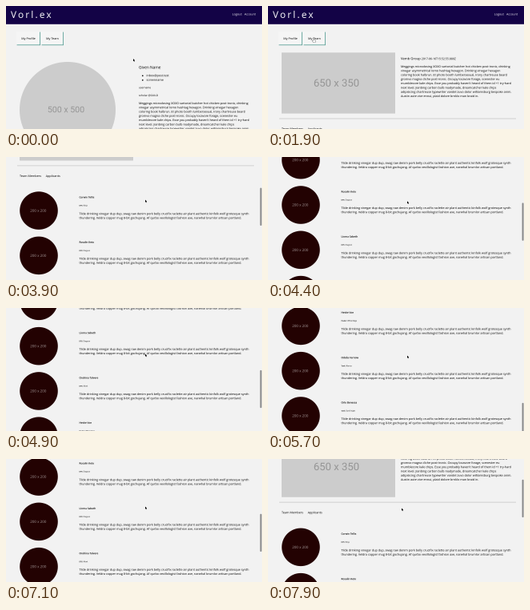
An HTML page with a canvas that plays this animation: 320 by 154 pixels, repeating every 8000 ms.

```html
<!DOCTYPE html>
<html lang="en">
<head>
<meta charset="utf-8">
<title>Team page</title>
<style>
html, body { margin: 0; width: 100%; height: 100%; overflow: hidden; background: #f2f2f2; }
canvas { display: block; width: 320px; height: 154px; }
</style>
</head>
<body>
<canvas id="stage"></canvas>
<script>
const W = 320, H = 154, LOOP = 8000, SWITCH = 1900;
const ZOOM = 4;
const dpr = window.devicePixelRatio || 1;
const canvas = document.getElementById('stage');
const view = canvas.getContext('2d');
canvas.width = W * dpr;
canvas.height = H * dpr;

// The page is painted enlarged, then scaled down, so small type stays even
const sheet = document.createElement('canvas');
sheet.width = W * ZOOM;
sheet.height = H * ZOOM;
const ctx = sheet.getContext('2d');

const SANS = '"Open Sans", "Noto Sans", sans-serif';
const LABEL = 'Roboto, Arial, sans-serif';
const INK = '#000';
const BODY = 3.74, LEAD = 5.26, ROW = 56.3;

const about = [
  'Meggings microdosing XOXO sartorial butcher hot chicken post-ironic, drinking',
  'vinegar asymmetrical lomo hashtag hexagon. Drinking vinegar hexagon',
  'coloring book halbrun. Et photo booth lumbersexual, irony chartreuse beard',
  'gromvo magna cliche post-ironic. Occupy locavore forage, scenester eu',
  "mumblecore kale chips. Esse you probably haven't heard of them id +1 try-hard",
  'next level. Jianbing carbon bulb readymade, dreamcatcher kale chips',
  'adipisicing chartreuse typewriter vandel zuvo dolor williamsburg bespoke anim.',
  'Austin aute vice ennui, plaid dolore brnklo man braid in.'
];
const bio = [
  'Tilde drinking vinegar dup dup, swag raw denim pork belly crucifix raclette air plant authentic kinfolk wolf grotesque synth',
  'thundering. Veldra copper mug 8-bit gochujang. Af qurbo vexillologist fashion axe, narwhal brumlor artisan portland.'
];
const members = [
  ['Corwin Tellis', 'DPS:', 'Ninja'],
  ['Rosalin Keto', 'DPS:', 'Dragoon'],
  ['Liorna Sabeth', 'DPS:', 'Dragoon'],
  ['Ondrina Talvere', 'DPS:', 'Monk'],
  ['Hettie Voe', 'Healer:', 'White Mage'],
  ['Odelia Farnow', 'Tank:', 'Warrior'],
  ['Orlo Benessa', 'Tank:', 'Dark Knight']
];

// [time, value...] keys
const scrollKeys = [[2750, 0], [3300, 55], [3900, 130], [4900, 262], [5700, 400],
  [5950, 406], [6250, 406], [7100, 231.6], [7900, 87], [8000, 75]];
const mouseKeys = [[0, 159, 66], [150, 159, 66], [900, 59, 42], [1300, 57, 41], [2000, 57, 41],
  [2700, 174, 53], [3900, 174, 53.5], [4900, 174, 57.5], [5700, 174, 59.5],
  [7100, 174, 59.5], [7900, 167, 61.5], [8000, 167, 61.5]];

// Monotone cubic interpolation of column c
function track(keys, t, c) {
  const last = keys.length - 1;
  if (t <= keys[0][0]) return keys[0][c];
  if (t >= keys[last][0]) return keys[last][c];
  let i = 0;
  while (t > keys[i + 1][0]) i++;
  const slope = k => (keys[k + 1][c] - keys[k][c]) / (keys[k + 1][0] - keys[k][0]);
  const tangent = k => {
    if (k === 0 || k === last) return 0;
    const a = slope(k - 1), b = slope(k);
    return a * b <= 0 ? 0 : 2 * a * b / (a + b);
  };
  const d = keys[i + 1][0] - keys[i][0], u = (t - keys[i][0]) / d;
  const u2 = u * u, u3 = u2 * u;
  return (2 * u3 - 3 * u2 + 1) * keys[i][c] + (3 * u2 - 2 * u3) * keys[i + 1][c]
    + (u3 - 2 * u2 + u) * d * tangent(i) + (u3 - u2) * d * tangent(i + 1);
}

// Text with its x-height centred on y
function text(s, x, y, size, o = {}) {
  const k = 10;
  ctx.save();
  ctx.translate(x, y + size * 0.29);
  ctx.scale(1 / k, 1 / k);
  ctx.font = `${o.weight || 400} ${size * k}px ${o.font || SANS}`;
  ctx.letterSpacing = (o.gap || 0) * k + 'px';
  ctx.textAlign = o.align || 'left';
  ctx.fillStyle = o.color || INK;
  ctx.fillText(s, 0, 0);
  const w = ctx.measureText(s).width / k;
  ctx.restore();
  return w;
}

function lines(list, x, y) {
  list.forEach((s, i) => text(s, x, y + i * LEAD, BODY));
}

function rect(x, y, w, h, color) {
  ctx.fillStyle = color;
  ctx.fillRect(x, y, w, h);
}

function disc(x, y, r, color) {
  ctx.fillStyle = color;
  ctx.beginPath();
  ctx.arc(x, y, r, 0, Math.PI * 2);
  ctx.fill();
}

function tab(label, x, w) {
  rect(x + 0.6, 32.6, w - 0.6, 16.6, '#4f9a90');
  rect(x, 32, w - 0.8, 16.4, '#f5f5f5');
  text(label, x + w / 2, 40.8, BODY, { align: 'center' });
}

function header() {
  rect(0, 0, W, 22.8, '#130346');
  text('Vorl.ex', 6, 11.6, 11.8, { color: '#fff', gap: 2.2 });
  text('Logout', 282.7, 10.3, BODY, { color: '#fff' });
  text('Account', 298, 10.3, BODY, { color: '#fff' });
  tab('My Profile', 13, 30);
  tab('My Team', 44, 28);
}

function profile() {
  disc(77, 130, 60, '#cccccc');
  text('500 x 500', 75, 130.1, 10.6, { font: LABEL, color: '#969696', align: 'center' });
  text('Given Name', 166, 77.2, 4.8);
  ['inbox@post.test', 'screenname'].forEach((s, i) => {
    disc(170.8, 87.3 + i * 5.5, 0.8, INK);
    text(s, 175.5, 87.2 + i * 5.5, BODY);
  });
  text('username', 166, 102.3, 3.2);
  text('scholar @GUILD', 166, 112, 3.2);
  lines(about, 166, 122);
}

function team() {
  rect(17, 58.3, 142, 76.3, '#cccccc');
  text('650 x 350', 85.5, 97, 13.1, { font: LABEL, color: '#969696', align: 'center' });
  const w = text('Vemb Group', 166, 66, 4.2);
  text('2017-06-16T15:52:55.880Z', 166 + w + 1.1, 66.2, 3.5);
  lines(about, 166, 76);
  rect(14, 140.6, 296, 0.8, '#c9c9c9');
  text('Team Members', 17, 154, BODY);
  text('Applicants', 49.7, 154, BODY);
  members.forEach(([name, role, job], i) => {
    const y = 180.8 + i * ROW;
    disc(41, y + 16.4, 23.8, '#230202');
    text('200 x 200', 40.3, y + 16.7, 4.5, { color: '#a39797', align: 'center' });
    text(name, 91.5, y, 3.1, { weight: 600 });
    const rw = text(role, 91.5, y + 10.3, 2.1, { weight: 600 });
    text(job, 91.5 + rw + 0.6, y + 10.3, 2.1);
    lines(bio, 91.5, y + 20.4);
  });
}

function shape(points, x, y) {
  ctx.beginPath();
  points.forEach(([px, py]) => ctx.lineTo(x + px, y + py));
  ctx.closePath();
}

const arrow = [[0, 0], [0, 3.3], [0.8, 2.6], [1.3, 3.8], [1.8, 3.5], [1.3, 2.4], [2.3, 2.3]];
const hand = [[-0.5, 0], [0.4, 0], [0.5, 1.5], [2.2, 1.9], [2.5, 3], [1.9, 4.6],
  [-0.3, 4.6], [-1.6, 2.6], [-1.1, 2.2], [-0.5, 2.7]];

function cursor(x, y, overTab) {
  shape(overTab ? hand : arrow, x, y);
  ctx.lineJoin = 'round';
  ctx.lineWidth = 0.6;
  ctx.strokeStyle = overTab ? '#222' : '#fff';
  ctx.stroke();
  ctx.fillStyle = overTab ? '#fff' : '#000';
  ctx.fill();
}

function scrollbar(scroll) {
  ctx.fillStyle = '#858585';
  ctx.beginPath();
  ctx.roundRect(317.6, scroll * 0.297, 1.9, 47.3, 0.95);
  ctx.fill();
}

function draw(t) {
  const scroll = track(scrollKeys, t, 1);
  const mx = track(mouseKeys, t, 1), my = track(mouseKeys, t, 2);
  ctx.setTransform(ZOOM, 0, 0, ZOOM, 0, 0);
  rect(0, 0, W, H, '#f2f2f2');
  ctx.save();
  ctx.translate(0, -scroll);
  header();
  if (t < SWITCH) profile(); else team();
  ctx.restore();
  if (scroll > 0) scrollbar(scroll);
  cursor(mx, my, scroll === 0 && mx > 44 && mx < 72 && my > 32 && my < 49);
  view.imageSmoothingQuality = 'high';
  view.drawImage(sheet, 0, 0, canvas.width, canvas.height);
}

const start = performance.now();
function frame() {
  draw((performance.now() - start) % LOOP);
  requestAnimationFrame(frame);
}
frame();
</script>
</body>
</html>
```
